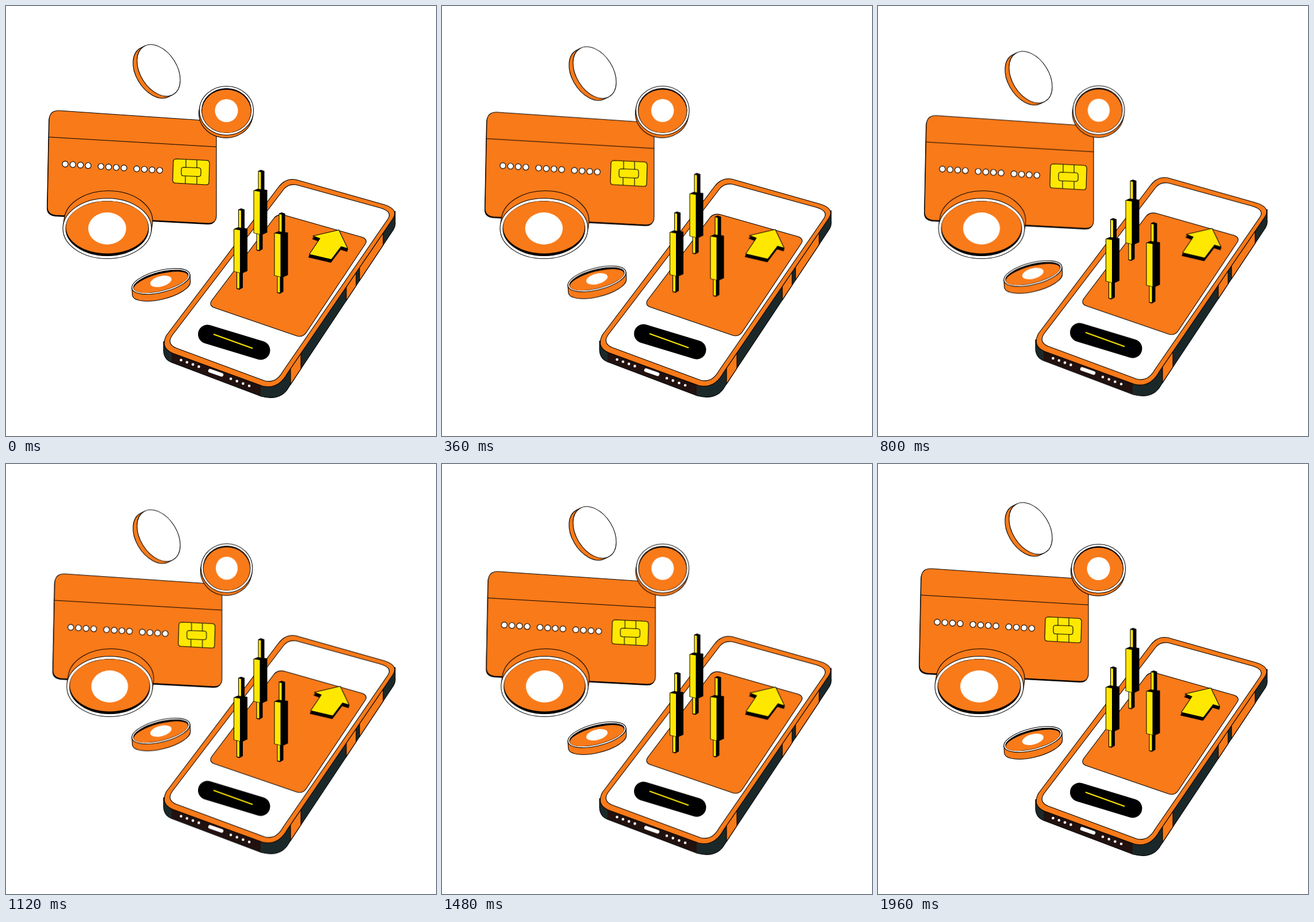
Animation of 748x748 px, one loop 2 s. Source, as an HTML page:

```html
<!DOCTYPE html>
<html lang="en">
<head>
<meta charset="utf-8">
<title>Card and phone trading</title>
<style>
  html, body { margin: 0; width: 100%; height: 100%; overflow: hidden; background: #fff; }
  svg { display: block; width: 100vw; height: 100vh; }
  .o { fill: #f97a19; }
  .y { fill: #ffe800; }
  .w { fill: #fff; }
  .d { fill: #1b2829; }
  .line { stroke: #000; stroke-width: 1.1; stroke-linejoin: round; }
  .bare { fill: none; }
  .move { animation: drift 1s cubic-bezier(.364, 0, .636, 1) infinite alternate; }
  @keyframes drift {
    from { transform: translate(0, 0) scaleX(1); }
    to { transform: translate(var(--x, 0px), var(--y, 0px)) scaleX(var(--s, 1)); }
  }
  #card { --x: 10px; --y: 9.5px; }
  #blank { --y: 13px; }
  #upper { --x: .5px; --y: -.8px; --s: .95; transform-origin: 383px 184px; }
  #large { --x: 4.5px; --s: .968; transform-origin: 176px 387px; }
  #tilted { --y: -15px; }
  #phone { --y: -3.5px; }
  #arrow { --x: 2.5px; --y: -3px; }
  #candles { --y: 18.7px; }
</style>
</head>
<body>
<svg viewBox="0 0 748 748">
  <defs>
    <path id="cardShape" d="M93 182L351 199.500Q366 200.500 366 215V364Q366 379 351 378L86 364Q71 362 72 348L75 198Q76 181 93 182Z"/>
    <path id="pointer" d="M579 389.500L594.500 422 583 418.500 566 441 527.500 432 546 404.500 534 400Z"/>
    <g id="candle">
      <path d="M404 354L409 352 415 354V388H404Z"/>
      <path class="y" d="M405 355L409 356V388H405Z"/>
      <path d="M401 462H412V490L406 493.500 401 492Z"/>
      <path class="y" d="M402 462H406V491.500L402 491Z"/>
      <path d="M396 388L403 385 420 387V461L410 465.500 396 462Z"/>
      <path class="y" d="M397 388.500L407 390V464L397 461.500Z"/>
    </g>
  </defs>

  <g id="card" class="move">
    <use href="#cardShape" x="-1" y="2"/>
    <use href="#cardShape" class="o line"/>
    <path class="line bare" d="M75 228L366 245"/>
    <g id="digits" class="w line"></g>
    <path class="y line" d="M297 266L349 268.500Q354 269 354 274L353 307Q353 311 348 311L295 308Q290 308 290 303L291 271Q291 266 297 266Z"/>
    <path class="line bare" d="M309 280.500L335 281.500Q339 281.500 339 285.500V292.500Q339 296.500 335 296.500L309 295.500Q305 295.500 305 291.500V284.500Q305 280.500 309 280.500ZM313 267V280.500M332 268V281.500M312 296V309M332 297V310"/>
  </g>

  <g id="blank" class="move"></g>
  <g id="upper" class="move"></g>
  <g id="large" class="move"></g>
  <g id="tilted" class="move"></g>

  <g id="phone" class="move">
    <path class="d line" d="M274 584V600Q275 615 288 620L444 679Q478 688 492 663L672 392Q678 384 677 376V357Z"/>
    <path fill="#21110f" d="M288 600L443 656V678L288 619Z"/>
    <g id="bands" class="o line"></g>
    <g id="holes" class="w"></g>
    <path stroke="#fff" stroke-width="6.500" stroke-linecap="round" d="M355 634.500L375 641.500"/>
    <path class="o line" d="M504 302L656 345Q684 353 673 370L490 638Q474 668 446 661L290 604Q268 595 279 573L474 315Q486 299 504 302Z"/>
    <path class="w line" d="M505 311L652 351.500Q673 358 664 371L482 635Q470 657 450 652L296 595Q279 588 289 573L483 319Q491 309 505 311Z"/>
    <path class="o line" d="M485 364L619 402Q630 406 625 414L523 567Q517 577 506 574L363 525Q352 521 358 512L467 368Q474 361 485 364Z"/>
    <path stroke="#000" stroke-width="33" stroke-linecap="round" d="M350.500 571L443 599"/>
    <path stroke="#ffe800" stroke-width="2" d="M361 571L429 595.500"/>
  </g>

  <g id="arrow" class="move">
    <use href="#pointer" x="-1" y="5" class="line"/>
    <use href="#pointer" y="2.500" class="line"/>
    <use href="#pointer" class="y line"/>
  </g>

  <g id="candles" class="move">
    <use href="#candle" x="34.500" y="-67"/>
    <use href="#candle"/>
    <use href="#candle" x="70.500" y="7"/>
  </g>
</svg>
<script>
  const put = (id, markup) => { document.getElementById(id).innerHTML += markup; };
  const dot = (x, y, r) => `<circle cx="${x}" cy="${y}" r="${r}"/>`;
  const oval = (cls, x, y, rx, ry, turn = 0) =>
    `<ellipse class="${cls}" rx="${rx}" ry="${ry}" transform="translate(${x} ${y}) rotate(${turn})"/>`;

  // Outline of an ellipse swept along the vector (dx, dy).
  function sweep(x, y, rx, ry, turn, dx, dy) {
    const a = turn * Math.PI / 180, c = Math.cos(a), s = Math.sin(a);
    const u = (dx * c + dy * s) / rx, v = (dy * c - dx * s) / ry, n = Math.hypot(u, v);
    const px = v / n * rx, py = -u / n * ry;
    const ex = px * c - py * s, ey = px * s + py * c;
    return `<path class="o line" d="M${x + ex} ${y + ey}l${dx} ${dy}` +
      `A${rx} ${ry} ${turn} 0 1 ${x + dx - ex} ${y + dy - ey}l${-dx} ${-dy}Z"/>`;
  }

  // Coin with a rim, a recessed face and a plain round emblem.
  function coin(id, { x, y, rx, ry, turn = 0, dx, dy, rim, lip, emblem }) {
    put(id, sweep(x, y, rx, ry, turn, dx, dy) +
      oval('w line', x, y, rx, ry, turn) +
      oval('line', x, y, rx - rim, ry - rim, turn) +
      oval('o', x, y + lip, rx - rim - .5, ry - rim - Math.abs(lip), turn) +
      oval('w', x, y, ...emblem, turn));
  }

  put('blank', sweep(265.5, 112, 49, 32, 58, -7, 3.5) + oval('w line', 265.5, 112, 49, 32, 58));
  coin('upper', { x: 383.5, y: 182, rx: 47, ry: 42.5, dx: -1, dy: 5, rim: 4, lip: 1, emblem: [20, 20] });
  coin('large', { x: 176, y: 387, rx: 77, ry: 52.5, dx: 2, dy: -13, rim: 5, lip: -2, emblem: [33, 28] });
  coin('tilted', { x: 269.5, y: 479, rx: 51.9, ry: 19.1, turn: -14.2, dx: .8, dy: 12, rim: 3, lip: 1.5, emblem: [19, 9] });

  for (let i = 0; i < 12; i++) {
    const x = 103 + 62.2 * Math.floor(i / 4) + 13.3 * (i % 4);
    put('digits', dot(x, 275 + (x - 103) * .066, 5.1));
  }

  // Upper and lower borders of the phone's right side.
  const edge = x => 370 + (673 - x) * 1.465;
  const base = x => 392 + (672 - x) * 1.505;
  for (const [l, r] of [[615, 656], [592, 609], [495, 513]])
    put('bands', `<path d="M${l} ${edge(l)}V${base(l)}L${r} ${base(r)}V${edge(r)}Z"/>`);

  for (let i = 0; i < 4; i++)
    put('holes', dot(304.5 + 10.3 * i, 616 + 3.8 * i, 2.3) + dot(391 + 10.7 * i, 648.5 + 4.1 * i, 2.3));
</script>
</body>
</html>
```
